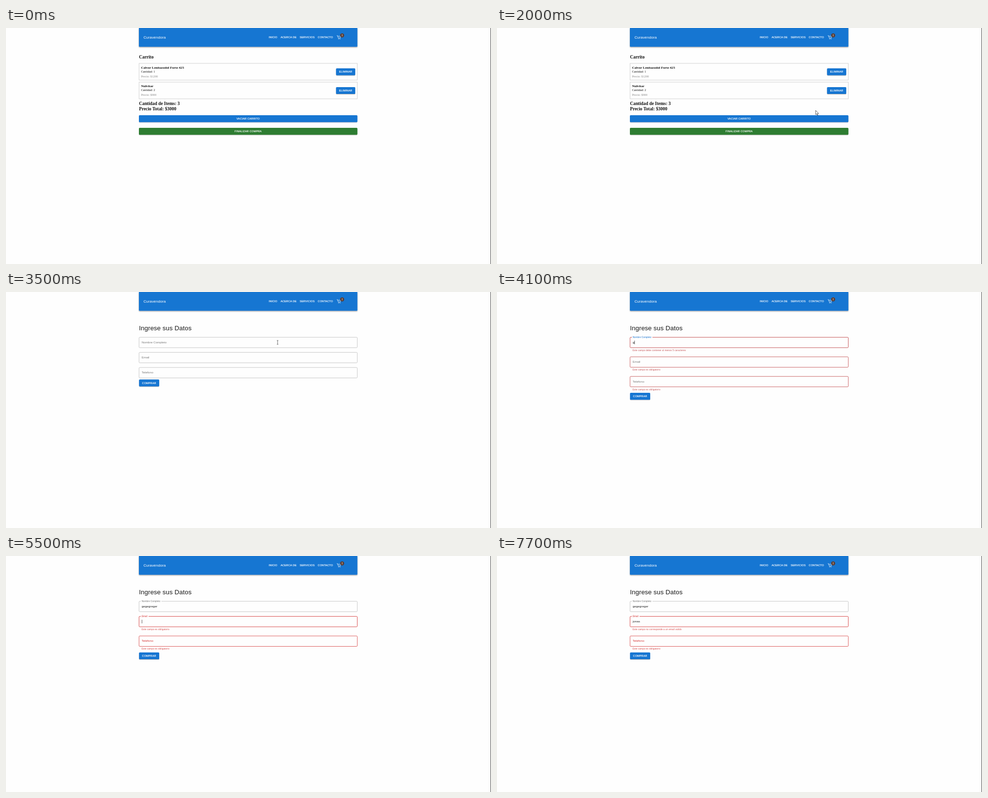
Recreate the animation shown at these times as an HTML page. Size 1000x487 px, loop 8 s.

```html
<!DOCTYPE html>
<html lang="es">
<head>
<meta charset="utf-8">
<title>Carrito</title>
<style>
  html, body { margin: 0; width: 100%; height: 100%; overflow: hidden; background: #fefefe; }
  svg { display: block; width: 1000px; height: 487px; }
  text { font-family: "Liberation Sans", Arial, sans-serif; white-space: pre; }
  .serif { font-family: "Liberation Serif", "Times New Roman", serif; }
  .btn { font-size: 5.46px; letter-spacing: .02857em; fill: #fff; stroke: #fff; stroke-width: .16px; }
  .mid { text-anchor: middle; }
  .bold { font-weight: 700; }
  .input { font-size: 6.24px; letter-spacing: .00938em; fill: #222; }
  .help { font-size: 4.68px; letter-spacing: .03333em; }
</style>
</head>
<body>
<svg viewBox="0 0 1000 487">
  <defs>
    <filter id="barShade" x="-5%" y="-20%" width="110%" height="150%">
      <feDropShadow dx="0" dy="1.2" stdDeviation="1.2" flood-opacity=".38"/>
    </filter>
    <filter id="shade" x="-10%" y="-30%" width="120%" height="180%">
      <feDropShadow dx="0" dy=".8" stdDeviation=".7" flood-opacity=".4"/>
    </filter>
    <clipPath id="payClip"><rect x="274" y="206" width="450.5" height="14.2" rx="1.6"/></clipPath>
  </defs>
  <rect width="1000" height="487" fill="#fefefe"/>
  <rect x="999" width="1" height="487" fill="#4a4a4a"/>
  <g id="bar"></g>
  <g id="page"></g>
  <g id="pointer"></g>
</svg>
<script>
const LOOP = 8000, STEP = 100;
const LEFT = 274.3, WIDTH = 450;
const BLUE = '#1976d2', BLUE_DARK = '#1565c0', GREEN = '#2e7d32', GREEN_DARK = '#1b5e20';
const RED = '#d32f2f', GREY = '#757575';
const $ = id => document.getElementById(id);
const clamp = v => Math.max(0, Math.min(1, v));
const mix = (a, b, p) => a + (b - a) * p;

const text = (x, y, str, cls, attrs = '') =>
  `<text x="${x}" y="${y}" class="${cls}" ${attrs}>${str}</text>`;

const button = (x, y, w, label, fill) =>
  `<rect x="${x}" y="${y}" width="${w}" height="14.2" rx="1.6" fill="${fill}" filter="url(#shade)"/>` +
  text(x + w / 2, y + 9, label, 'btn mid');

// Last entry whose start time has passed
const latest = (list, t) => list.reduce((found, e) => e[0] <= t ? e : found, list[0]);

// Header
const links = [[541.8, 'INICIO'], [566.2, 'ACERCA DE'], [605.5, 'SERVICIOS'], [642.8, 'CONTACTO']];
$('bar').innerHTML =
  `<path d="M274 0H724.5V37.4Q724.5 38.8 723.1 38.8H275.4Q274 38.8 274 37.4Z" fill="${BLUE}" filter="url(#barShade)"/>` +
  text(283.4, 21.8, 'Curavendora', '', 'fill="#fff" font-size="7.85" letter-spacing=".06"') +
  links.map(([x, s]) => text(x, 21.3, s, 'btn')).join('') +
  `<path d="M682 15.8H683.6L685.2 20.7H689L690.2 17H684" fill="none" stroke="#fff" stroke-width=".75"/>
   <circle cx="685.7" cy="22.4" r=".75" fill="#fff"/><circle cx="688.7" cy="22.4" r=".75" fill="#fff"/>
   <circle cx="693.1" cy="15.3" r="4.2" fill="#593f38"/>` +
  text(693.1, 17, '3', 'mid', 'fill="#f6e6da" font-size="4.8"');

// Cart view
const items = [['Calvor Lenitazodol Forte 425', 1, 1200], ['Nulvitar', 2, 900]];

function itemCard([name, count, price], i) {
  const y = 73 + i * 38.7;
  return `<rect x="${LEFT}" y="${y}" width="${WIDTH}" height="34.4" fill="none" stroke="#cdcdcd" stroke-width=".9"/>` +
    text(278.4, y + 10.7, name, 'serif bold', 'font-size="7.05" fill="#111"') +
    text(278.4, y + 18.7, 'Cantidad: ' + count, 'serif', 'font-size="6.24" fill="#111"') +
    text(278.4, y + 28.6, 'Precio: $' + price, 'serif', 'font-size="6.24" fill="#858585"') +
    button(680.5, y + 10.2, 39.6, 'ELIMINAR', BLUE);
}

function cartView(t, pos) {
  const over = y => pos && pos[1] >= y && pos[1] <= y + 14.2;
  const title = (y, s) => text(274.2, y, s, 'serif bold', 'font-size="9.4" fill="#111"');
  let out = title(62.5, 'Carrito') + items.map(itemCard).join('') +
    title(158.9, 'Cantidad de Items: 3') + title(169.9, 'Precio Total: $3000') +
    button(274, 180, 450.5, 'VACIAR CARRITO', over(180) ? BLUE_DARK : BLUE) +
    button(274, 206, 450.5, 'FINALIZAR COMPRA', over(206) ? GREEN_DARK : GREEN);
  if (t >= 3000) {
    const early = t < 3100;
    out += `<circle cx="664" cy="213" r="${early ? 15.5 : 110}" fill="#fff" opacity="${early ? .12 : .06}" clip-path="url(#payClip)"/>`;
  }
  return out;
}

// Form view
const nameTyping = [[0, 0], [4000, 1], [4200, 3], [4300, 4], [4400, 5], [4500, 7], [4700, 9], [4800, 10]];
const mailTyping = [[0, 0], [6200, 1], [6300, 2], [6800, 3], [7000, 4], [7200, 5]];
const typed = (word, list, t) => word.slice(0, latest(list, t)[1]);

// Blink restarts with each key press
const caretOn = (start, list, t) =>
  Math.floor((t - Math.max(start, latest(list, t)[0])) / 500) % 2 === 0;

function field(y, f) {
  const p = f.shrink, size = mix(6.24, 4.68, p);
  const tone = f.error ? f.tone || RED : f.focus ? BLUE : GREY;
  const edge = f.error ? f.edge || RED : f.focus ? BLUE : '#c2c2c2';
  let out = `<rect x="${LEFT}" y="${y}" width="${WIDTH}" height="21.5" rx="1.6" fill="none" stroke="${edge}" stroke-opacity="${f.error ? .85 : 1}" stroke-width="${f.focus ? 1 : .9}"/>`;
  if (p > .5) out += `<rect x="278" y="${y - 1}" width="${f.notch}" height="2" fill="#fefefe"/>`;
  out += text(279.7, mix(y + 12.4, y + 1.1, p), f.label, '', `font-size="${size}" letter-spacing=".05" fill="${tone}"`);
  if (f.value) out += text(279.7, y + 12.4, f.value, 'input', f.focus ? 'data-live="1"' : '');
  if (f.caret) out += `<rect class="caret" x="279.9" y="${y + 7}" width=".7" height="7.4" fill="#222"/>`;
  if (f.error) out += text(279.5, y + 28.3, f.error, 'help', `fill="${f.edge || RED}" fill-opacity=".88"`);
  return out;
}

function formView(t) {
  const required = 'Este campo es obligatorio';
  const name = typed('gegegreger', nameTyping, t);
  const mail = typed('jonas', mailTyping, t);
  const checked = t >= 4000, fresh = t < 4200;
  const nameFocus = t >= 3700 && t < 5200, mailFocus = t >= 5200;
  const edge = fresh ? '#bd3a3c' : RED;
  const fields = [
    { label: 'Nombre Completo', notch: 42.5, value: name, focus: nameFocus,
      shrink: clamp((t - 3600) / 200), edge, tone: fresh ? BLUE : RED,
      caret: nameFocus && caretOn(3700, nameTyping, t),
      error: checked && name.length < 5 ? 'Este campo debe contener al menos 5 caracteres' : '' },
    { label: 'Email', notch: 16, value: mail, focus: mailFocus,
      shrink: clamp((t - 5100) / 200), edge, tone: fresh ? GREY : RED,
      caret: mailFocus && caretOn(5200, mailTyping, t),
      error: !checked ? '' : mail ? 'Este campo no corresponde a un email valido' : required },
    { label: 'Telefono', shrink: 0, edge, tone: fresh ? GREY : RED, error: checked ? required : '' }
  ];
  let y = 93.4;
  let out = text(274.2, 78.6, 'Ingrese sus Datos', '', 'font-size="13.26" letter-spacing=".097" fill="#181818"');
  for (const f of fields) {
    out += field(y, f);
    y += f.error ? 40.4 : 31.2;
  }
  return out + button(274.3, y - 6.5, 41.6, 'COMPRAR', BLUE);
}

// Pointer
const track = [
  [1200, 531, 255], [1300, 575, 268], [1400, 670, 255], [1600, 783, 210], [1800, 715, 183],
  [2000, 657, 170], [2300, 660, 187], [2600, 662, 205], [2900, 664.5, 210.5],
  [3200, 664.5, 210.5], [3500, 560, 104], [3900, 560, 104]
];

function pointerAt(t) {
  if (t < track[0][0] || t > track[track.length - 1][0]) return null;
  const i = Math.max(1, track.findIndex(k => k[0] >= t));
  const a = track[i - 1], b = track[i], p = (t - a[0]) / (b[0] - a[0]);
  return [mix(a[1], b[1], p), mix(a[2], b[2], p)];
}

const shapes = {
  arrow: '<path d="M0 0V8.7L2 6.9L3.4 10L4.8 9.4L3.5 6.4H6.1Z" fill="#fff" stroke="#222" stroke-width=".7"/>',
  hand: '<path d="M-.2 .6Q.7-.6 1.5 .6V4L4.5 4.7Q5.5 5 5.3 6.2L4.5 10.4H.5L-2.2 6.7Q-1.8 5.4-.2 6.7Z" fill="#fff" stroke="#222" stroke-width=".6"/>',
  beam: '<path d="M-1.5-4H1.5M0-4V4M-1.5 4H1.5" fill="none" stroke="#333" stroke-width=".7"/>'
};

function pointerView(t, pos) {
  if (!pos) return '';
  const [x, y] = pos;
  const kind = t >= 3500 ? 'beam' : t < 3300 && (y >= 206 || (t > 2000 && y >= 180 && y <= 194)) ? 'hand' : 'arrow';
  return `<g transform="translate(${x} ${y})">${shapes[kind]}</g>`;
}

let last = -1;
function draw(t) {
  if (t === last) return;
  last = t;
  const pos = pointerAt(t);
  $('page').innerHTML = t < 3300 ? cartView(t, pos) : formView(t);
  const live = document.querySelector('[data-live]'), caret = document.querySelector('.caret');
  if (live && caret) caret.setAttribute('x', 279.9 + live.getComputedTextLength());
  $('pointer').innerHTML = pointerView(t, pos);
}

const start = performance.now();
function tick() {
  const t = (performance.now() - start) % LOOP;
  draw(Math.floor(t / STEP) * STEP);
  requestAnimationFrame(tick);
}
tick();
</script>
</body>
</html>
```
